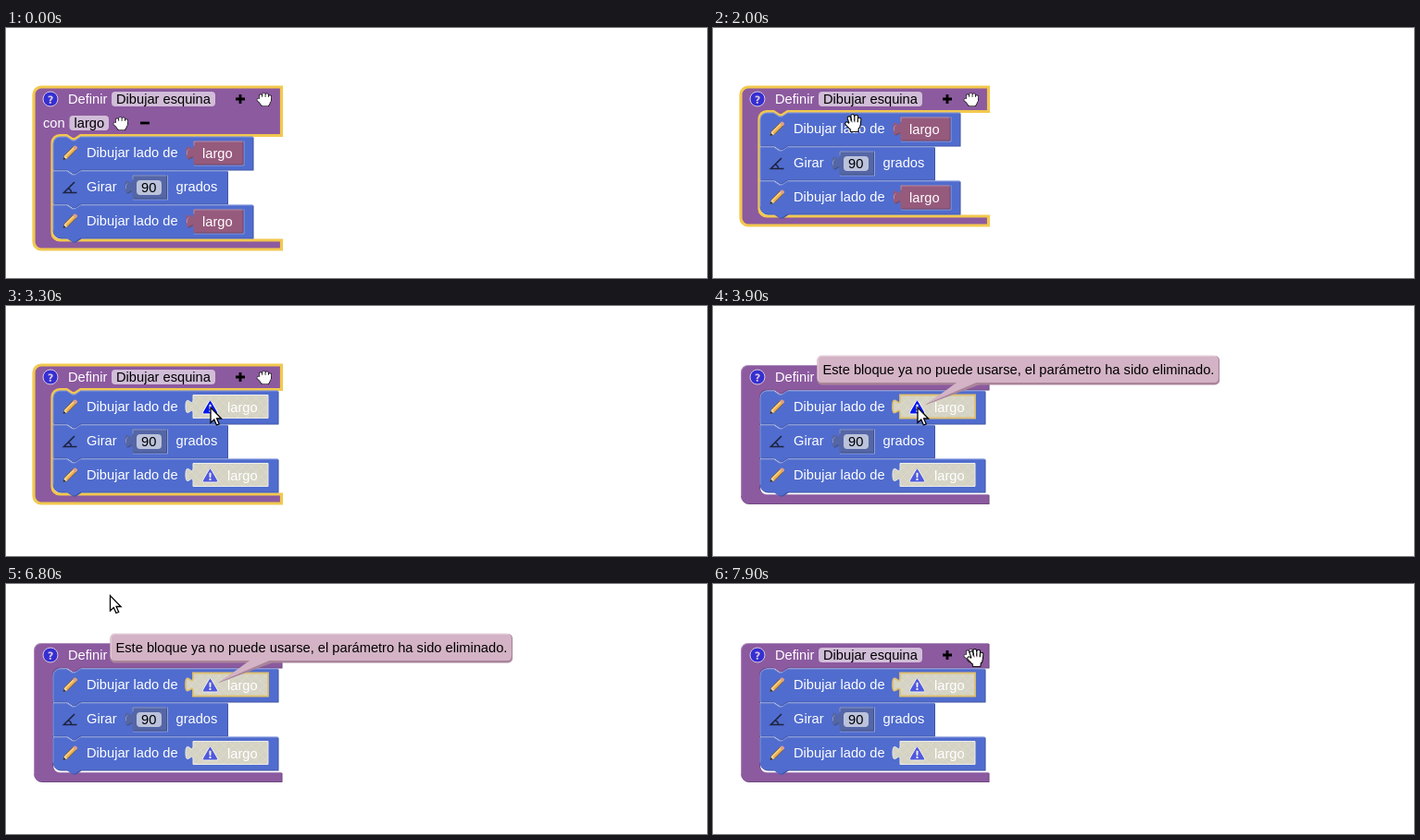
Write an HTML page that moves like this. It is 757 px wide and 271 px high and loops after 8 s.

```html
<!DOCTYPE html>
<html lang="es">
<head>
<meta charset="utf-8">
<title>Bloques</title>
<style>
  html, body { margin: 0; width: 100%; height: 100%; overflow: hidden; background: #fff; }
  svg { display: block; width: 100%; height: 100%; }
  text { font: 14.667px "Liberation Sans", Arial, sans-serif; white-space: pre; }
</style>
</head>
<body>
<svg id="stage" viewBox="0 0 757 271"></svg>
<script>
const LOOP = 8000, STEP = 100;
const REMOVED = 2000, DISABLED = 2100, POPUP_OPEN = 3900, POPUP_CLOSED = 7500;
const PURPLE = '#8c5a9f', BLUE = '#506cce', RED = '#965a7c', SLATE = '#5566a6', GOLD = '#f2c84e';

// Pointer keys: time, x, y, shape. A null shape hides the pointer.
const pointerKeys = [
  [0, 0, 0, null], [900, 233, 226, 'hand'], [1000, 233, 226, 'hand'], [1100, 216, 198, 'hand'],
  [1200, 182, 148, 'hand'], [1300, 160, 117, 'hand'], [1500, 153, 107, 'hand'], [1600, 153, 107, 'hand'],
  [1800, 151, 103, 'hand'], [2300, 151, 103, 'hand'], [2500, 147, 104, 'hand'], [2800, 157, 110, 'hand'],
  [3100, 231, 120, 'hand'], [3200, 231, 120, 'hand'], [3300, 221, 110, 'arrow'], [4500, 221, 110, 'arrow'],
  [4600, 229, 122, 'hand'], [4700, 255, 175, 'hand'], [4800, 286, 226, 'arrow'], [4900, 0, 0, null],
  [6800, 112.5, 12.5, 'arrow'], [6900, 205, 70, 'arrow'], [7000, 269, 123, 'hand'], [7100, 269, 123, 'hand'],
  [7200, 252, 118, 'hand'], [7300, 236, 114, 'hand'], [7400, 222, 110, 'arrow'], [7600, 223, 109, 'arrow'],
  [7700, 243, 100, 'hand'], [7800, 270, 86, 'hand'], [7900, 283, 80, 'hand']
];

function pointerAt(t) {
  const i = pointerKeys.findLastIndex(key => key[0] <= t);
  const [t0, x, y, shape] = pointerKeys[i];
  const next = pointerKeys[i + 1];
  if (!next || !next[3]) return { x, y, shape };
  const k = (t - t0) / (next[0] - t0);
  return { x: x + (next[1] - x) * k, y: y + (next[2] - y) * k, shape };
}

const path = (d, attrs) => `<path d="${d}" ${attrs}/>`;
const at = (x, y, content, attrs = '') => `<g transform="translate(${x} ${y})" ${attrs}>${content}</g>`;
const label = (x, y, text, fill = '#fff') => `<text x="${x}" y="${y}" fill="${fill}">${text}</text>`;
const field = (x, y, w, text) =>
  `<rect x="${x}" y="${y}" width="${w}" height="16" rx="4" fill="#fff" fill-opacity=".6"/>` +
  label(x + 5, y + 13, text, '#000');

// Raised block: dark edge below right, light edge along the given line.
const raised = (d, color, lightEdge) =>
  at(1, 1, path(d, `fill="${color}"`) + path(d, 'fill="#000" fill-opacity=".2"')) +
  path(d, `fill="${color}"`) +
  path(lightEdge, 'fill="none" stroke="#fff" stroke-opacity=".3"');

function outlined(fingers, palm, outline) {
  const layer = (color, grow) =>
    path(fingers, `fill="none" stroke="${color}" stroke-width="${2.6 + grow}" stroke-linecap="round"`) +
    path(palm, `fill="${color}" stroke="${color}" stroke-width="${1 + grow}" stroke-linejoin="round"`);
  return layer('#000', 2 * outline) + layer('#fff', 0);
}

const handPointer = (x, y) => at(x, y,
  outlined('M-2.5 0L-4.6 -5.4M.2 -1L-.8 -7.6M3 0L3.2 -7M6 1L6.6 -4M-3 4.5L-7 .6',
    'M-4 0L6.6 0L6.4 4L4.6 6V8.6H-2.2V6.8L-4.6 4Z', 1) +
  path('M-2.2 -1.5L-2.9 -4.5M1.2 -1.5V-4.8M4.7 -1L4.9 -4', 'stroke="#000" stroke-width=".9"'));

// Closed, rounder hand used as a handle on the block.
const handIcon = (x, y) => at(x, y,
  outlined('M-3.6 0L-4 -4M-.6 0V-5.4M2.6 0L2.8 -5M5.6 1L6 -3M-3 3L-6.4 .4',
    'M-4.6 -2H6.2L6 2.5L4 6.4H-2.4L-5 2.5Z', .6));

const arrow = (x, y) => at(x, y,
  path('M0 0V16.5L3.8 13L6.4 19L9.2 17.8L6.6 12H11.6Z', 'fill="#fff" stroke="#000" stroke-width="1.3"'));

const helpIcon = at(40, 69,
  '<circle cx="8" cy="8" r="8" fill="#0818ec" stroke="#fff"/>' +
  path('m6.8,10h2c0.003,-0.617 0.271,-0.962 0.633,-1.266 2.875,-2.405 0.607,-5.534 -3.765,-3.874v1.7c3.12,-1.657 3.698,0.118 2.336,1.25 -1.201,0.998 -1.201,1.528 -1.204,2.19zM6.8 10.78h2v2h-2z', 'fill="#fff"'),
  'opacity=".65"');

const warningIcon = (x, y, hover) => at(x, y,
  path('M2,15Q-1,15 0.5,12L6.5,1.7Q8,-1 9.5,1.7L15.5,12Q17,15 14,15z', 'fill="#0818ec" stroke="#fff"') +
  path('m7,4.8v3.16l0.27,2.27h1.46l0.27,-2.27v-3.16zM7 11h2v2h-2z', 'fill="#fff"'),
  `opacity="${hover ? 1 : .65}"`);

const pencil = (x, y) => at(x, y,
  path('M1 15.5L2.2 11L12 1.2L15.3 4.3L5.5 14.2Z', 'fill="#efb04c" stroke="#69502f" stroke-width=".8"') +
  path('M3 12L13 2', 'stroke="#f8d692" stroke-width="1.3"') +
  path('M11 2.2L12.6 .7Q14 0 15.4 1.4T15.7 4L14.2 5.3Z', 'fill="#d9a08c"') +
  path('M1 15.5L2.2 11L5.5 14.2Z', 'fill="#e8d8b8"') +
  path('M.7 15.8L1.5 13L3.5 15Z', 'fill="#222"'));

const angle = (x, y) => at(x, y,
  path('M13 1L1.5 12.5H15.5M6 8Q9.5 9 9.5 12.5', 'fill="none" stroke="#1d2340" stroke-width="1.6"'));

const valueShape = (x, y, w) =>
  `M${x} ${y}h${w}v25h${-w}v-5c0,-10 -8,8 -8,-7.5s8,2.5 8,-7.5z`;

// Light rim where an inline value sits in its parent.
const valueRim = (x, y, w) =>
  path(`M${x + w + 1.5} ${y}v26.5h${-w - 1}`, 'fill="none" stroke="#fff" stroke-opacity=".35"');

function value(x, y, w, color) {
  return valueRim(x, y, w) +
    raised(valueShape(x, y, w), color, `M${x + .5} ${y + 5}V${y + .5}H${x + w}M${x - 7} ${y + 15}q-1 -5 2 -6`);
}

function largo(y, disabled, selected, hover) {
  const x = 202.5;
  if (!disabled) return value(x, y, 53, RED) + label(212, y + 18.5, 'largo');
  const d = valueShape(x - .5, y, 81);
  const edge = selected ? 'stroke="#dfc070" stroke-width="1.8"' : 'stroke="#ececea" stroke-width="1"';
  return path(d, `fill="url(#hatch)" ${edge}`) +
    warningIcon(212.5, y + 5.5, hover) + label(239, y + 18.5, 'largo');
}

function statement(y, right, first, last) {
  const x = 50.5, bottom = y + 36;
  const top = first ? `M${x} ${y + 8}a8,8 0 0 1 8,-8` : `M${x} ${y}`;
  const d = `${top}H${x + 15}l6,4 3,0 6,-4H${right}V${bottom}H${x + 30}l-6,4 -3,0 -6,-4` +
    (last ? `H${x + 8}a8,8 0 0 1 -8,-8z` : `H${x}z`);
  const edge = `M${x + .5} ${bottom - (last ? 8 : 0)}V${y + (first ? 8 : .5)}` +
    (first ? 'a7.5,7.5 0 0 1 7.5,-7.5' : '') + `H${x + 15}l6,4 3,0 6,-4H${right}`;
  return raised(d, BLUE, edge);
}

function definition(top, selected) {
  const bottom = top + 113.5;
  const d = `M30 72a8,8 0 0 1 8,-8H297.5V${top}H80.5l-6,4 -3,0 -6,-4H58a8,8 0 0 0 -8,8` +
    `V${bottom - 8}a8,8 0 0 0 8,8H297.5V${bottom + 10}H38a8,8 0 0 1 -8,-8z`;
  if (selected) return path(d, `fill="${PURPLE}" stroke="${GOLD}" stroke-width="3.2"`);
  return raised(d, PURPLE,
    `M30.5 ${bottom + 2}V72a7.5,7.5 0 0 1 7.5,-7.5H297M52.5 ${bottom - 2.5}a8,8 0 0 0 5.5,3H297`);
}

const popup =
  path('M264 83L229 107.5L294 83Z', 'fill="#a9849a"') +
  '<rect x="112.5" y="54" width="434.5" height="31.5" rx="5" fill="#a9849a"/>' +
  '<rect x="112.5" y="53.5" width="433" height="29.5" rx="5" fill="#e2c9d6"/>' +
  '<rect x="114" y="55" width="431.5" height="28" rx="4" fill="#d3b3c5"/>' +
  path('M266 81L231 106L289 81Z', 'fill="#d3b3c5"') +
  label(118.5, 74, 'Este bloque ya no puede usarse, el parámetro ha sido eliminado.', '#000');

const hatch = '<defs><pattern id="hatch" width="10" height="10" patternUnits="userSpaceOnUse">' +
  '<rect width="10" height="10" fill="#d5d3c6"/>' +
  path('M0 0L10 10M10 0L0 10', 'stroke="#dcdac2"') + '</pattern></defs>';

function scene(t) {
  const hasParam = t < REMOVED, disabled = t >= DISABLED, valueSelected = t >= POPUP_OPEN;
  const pointer = pointerAt(t);
  const hover = pointer.shape === 'arrow' && Math.hypot(pointer.x - 221, pointer.y - 110) < 9;
  const y = hasParam ? 117.5 : 91.5;
  const right = disabled ? 293.5 : 266.5;

  let out = hatch + definition(y - 1, !valueSelected) + helpIcon +
    label(67, 82, 'Definir') + field(114, 69, 112, 'Dibujar esquina') +
    path('M248 77h10M253 72v10', 'stroke="#000" stroke-width="2.8"') + handIcon(279, 77.5);
  if (hasParam) {
    out += label(40, 108, 'con') + field(68.5, 95, 42.5, 'largo') + handIcon(124, 103.5) +
      path('M145 103h10', 'stroke="#000" stroke-width="2.8"');
  }

  out += statement(y, right, true, false) + statement(y + 37, 239, false, false) +
    statement(y + 74, right, false, true);
  for (const row of [y, y + 74]) {
    out += pencil(61, row + 9.5) + label(87, row + 22.5, 'Dibujar lado de') +
      largo(row + 5, disabled, valueSelected && row === y, hover && row === y);
  }
  out += angle(61, y + 48.5) + label(87, y + 59.5, 'Girar') + value(136.5, y + 42, 36.5, SLATE) +
    field(141, y + 47.5, 27, '90') + label(183.5, y + 59.5, 'grados');

  if (t >= POPUP_OPEN && t < POPUP_CLOSED) out += popup;
  if (pointer.shape === 'hand') out += handPointer(pointer.x + .5, pointer.y);
  if (pointer.shape === 'arrow') out += arrow(pointer.x, pointer.y);
  return out;
}

const stage = document.getElementById('stage');
const start = performance.now();
let shown = -1;
function frame() {
  const elapsed = (performance.now() - start) % LOOP;
  const t = Math.floor(elapsed / STEP) * STEP;
  if (t !== shown) stage.innerHTML = scene(shown = t);
  requestAnimationFrame(frame);
}
frame();
</script>
</body>
</html>
```
